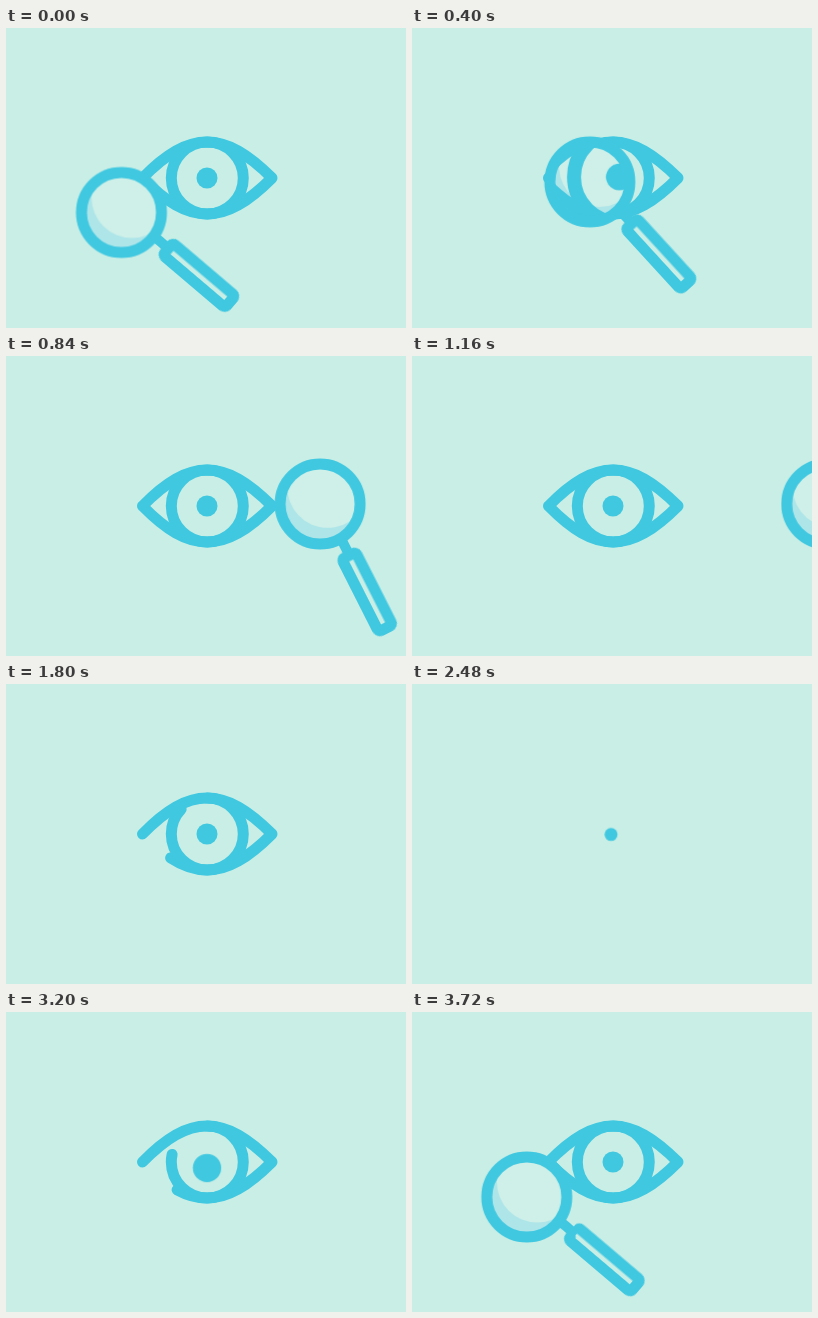
Animation, 400 px wide and 300 px high, one loop 3760 ms. Source, as an HTML page:

```html
<!DOCTYPE html>
<html lang="en">
<head>
<meta charset="utf-8">
<title>Eye and magnifier</title>
<style>
  @property --x { syntax: "<length>"; inherits: true; initial-value: 0px; }
  @property --y { syntax: "<length>"; inherits: true; initial-value: 0px; }
  @property --turn { syntax: "<angle>"; inherits: true; initial-value: 0deg; }

  html, body { margin: 0; width: 100%; height: 100%; overflow: hidden; background: #c9eee5; }
  svg { display: block; width: 100vw; height: 100vh; }

  .line { fill: none; stroke: #41c8e1; stroke-width: 11; stroke-linecap: round; stroke-linejoin: round; }
  .draw { stroke-dasharray: 1 2; }
  .stem { stroke-width: 10; }

  .lid, .iris, .ring, .handle, .stem, .glass, .px, .py, .pupil, .magnifier {
    animation: 3760ms cubic-bezier(.333, 0, .667, 1) infinite;
  }
  .lid { animation-name: lid; }
  .iris { animation-name: iris; }
  .ring { animation-name: ring; }
  .handle { animation-name: handle; animation-delay: -3740ms; }
  .stem { animation-name: stem; }
  .glass { animation-name: glass; }
  .px { animation-name: pupil-x; }
  .py { animation-name: pupil-y; }
  .pupil { animation-name: pupil-size; fill: #41c8e1; transform-box: fill-box; transform-origin: center; }

  /* the sweep begins just before the loop restarts */
  .magnifier {
    animation-name: move-x, move-y, turn;
    animation-delay: -40ms;
    transform: translate(var(--x), var(--y));
  }
  .arm { transform: rotate(calc(40.3deg + var(--turn))); }
  .shade { transform: rotate(calc(var(--turn) * -.45)); }
  /* the eye enlarged about the centre of the lens */
  .zoom { transform: scale(1.27) translate(calc(var(--x) * -1), calc(var(--y) * -1)); }

  @keyframes lid {
    0%, 44.681% { stroke-dashoffset: 0; }
    59.574%, 73.404% { stroke-dashoffset: 1.01; }
    88.83%, 100% { stroke-dashoffset: 0; }
  }
  @keyframes iris {
    0%, 44.681% { stroke-dashoffset: 0; }
    59.043%, 73.936% { stroke-dashoffset: 1.01; }
    89.894%, 100% { stroke-dashoffset: 0; }
  }
  @keyframes ring {
    0%, 50% { stroke-dashoffset: 0; }
    50.01%, 86.17% { stroke-dashoffset: 1.01; }
    96.81%, 100% { stroke-dashoffset: 0; }
  }
  @keyframes handle {
    0%, 50% { stroke-dashoffset: 0; }
    50.01%, 89.894% { stroke-dashoffset: 1.01; }
    100% { stroke-dashoffset: 0; }
  }
  @keyframes stem {
    0%, 50% { stroke-dashoffset: 0; }
    50.01%, 89% { stroke-dashoffset: 1.01; }
    94%, 100% { stroke-dashoffset: 0; }
  }
  @keyframes glass {
    0%, 50% { opacity: 1; }
    50.01%, 90% { opacity: 0; }
    97%, 100% { opacity: 1; }
  }

  @keyframes pupil-x {
    0%, 58.51% { transform: translateX(0); }
    65.957% { transform: translateX(-2px); }
    69.415% { transform: translateX(44px); }
    77.128% { transform: translateX(-70px); }
    84.043%, 100% { transform: translateX(0); }
  }
  @keyframes pupil-y {
    0%, 58.51% { transform: translateY(0); }
    65.957% { transform: translateY(.5px); }
    73.404% { transform: translateY(95px); }
    85.106% { transform: translateY(6px); }
    89.362%, 100% { transform: translateY(0); }
  }
  @keyframes pupil-size {
    0%, 56% { transform: scale(1); }
    65.957% { transform: scale(.62); }
    73.404% { transform: scale(1.33); }
    85.106% { transform: scale(1.35); }
    89.362%, 100% { transform: scale(1); }
  }

  @keyframes move-x {
    0% { --x: 114.8px; }
    45.48%, 75% { --x: 496px; }
    75.01%, 100% { --x: 114.8px; }
  }
  @keyframes move-y {
    0% { --y: 185px; }
    15.7%, 75% { --y: 148px; }
    75.01%, 100% { --y: 185px; }
  }
  @keyframes turn {
    0% { --turn: 0deg; }
    45.48%, 75% { --turn: 43.7deg; }
    75.01%, 100% { --turn: 0deg; }
  }
</style>
</head>
<body>
<svg viewBox="0 0 400 300">
  <defs>
    <clipPath id="lens"><circle r="36"/></clipPath>
    <!-- lens disc minus an offset disc -->
    <mask id="crescent" maskUnits="userSpaceOnUse" x="-40" y="-40" width="80" height="80">
      <circle r="36" fill="#fff"/>
      <circle cx="10.5" cy="-15" r="40.5" fill="#000"/>
    </mask>
  </defs>

  <g id="eye">
    <path class="line draw lid" pathLength="1"
      d="M136.5 150C160 126 180 114 201 114S242 126 266 150C242 174 222 186 201 186S160 174 136.5 150Z"/>
    <path class="line draw iris" pathLength="1"
      d="M201.3 114a36 36 0 0 1 0 72a36 36 0 0 1 0 -72"/>
    <g class="px"><g class="py"><circle class="pupil" cx="201" cy="150" r="10.5"/></g></g>
  </g>

  <g class="magnifier">
    <g class="arm">
      <path class="line draw stem" pathLength="1" d="M44 -3H57"/>
      <path class="line draw handle" pathLength="1"
        d="M59 2.5a3 3 0 0 0 3 3H137.5a3 3 0 0 0 3 -3V-7a3 3 0 0 0 -3 -3H62a3 3 0 0 0 -3 3Z"/>
    </g>
    <g class="glass" clip-path="url(#lens)">
      <circle r="36" fill="#cef0e8"/>
      <g class="shade">
        <rect x="-40" y="-40" width="80" height="80" fill="#aee5e8" mask="url(#crescent)"/>
      </g>
      <g class="zoom"><use href="#eye"/></g>
    </g>
    <path class="line draw ring" pathLength="1" d="M-40 0a40 40 0 0 1 80 0a40 40 0 0 1 -80 0"/>
  </g>
</svg>
</body>
</html>
```
